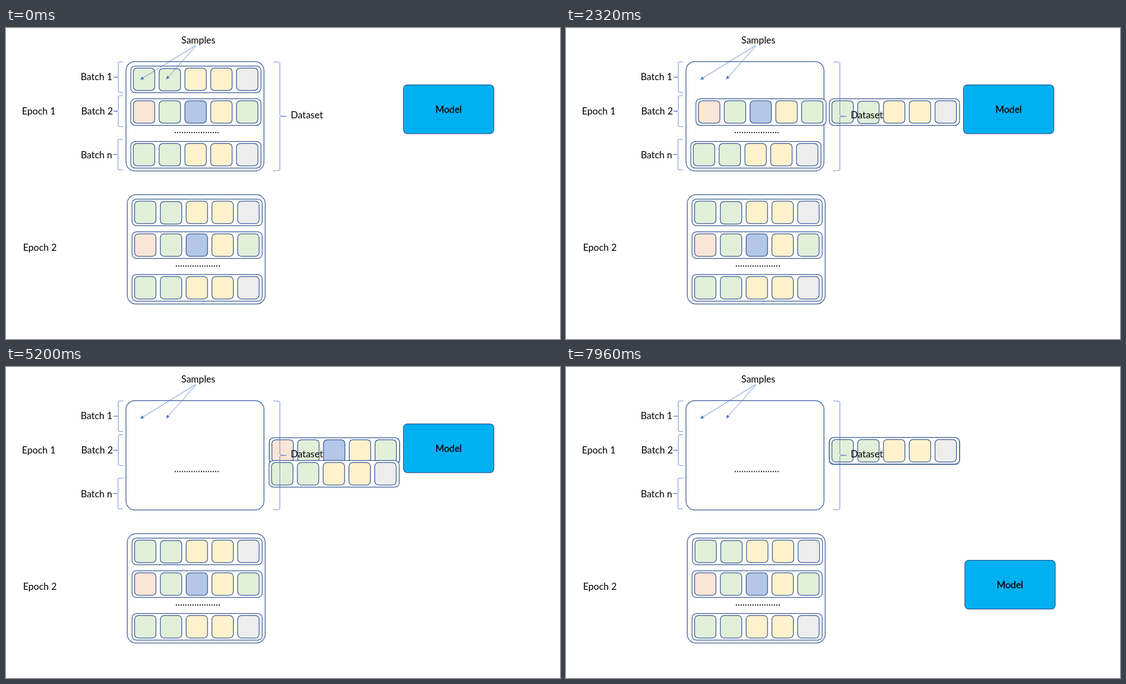
These frames come from a looping animation (998x561 px, 8 s). An HTML page:

```html
<!DOCTYPE html>
<html lang="en">
<head>
<meta charset="utf-8">
<title>Epochs and batches</title>
<style>
  html, body { margin: 0; width: 100%; height: 100%; overflow: hidden; background: #fff; }
  svg { display: block; width: 998px; height: 561px; }
  text { font: 17px Lato, "Open Sans", sans-serif; text-anchor: middle; fill: #000; }
  .box { fill: #fff; stroke: #2f528f; stroke-width: 1.25; }
  .line { fill: none; stroke: #4472c4; stroke-width: .85; }
  .dots { stroke: #000; stroke-width: 2.3; stroke-linecap: round; stroke-dasharray: 0 4.28; }
  .model { fill: #00b0f0; }
  .model + text { stroke: #000; stroke-width: .3; }
</style>
</head>
<body>
<svg id="stage" viewBox="0 0 998 561">
  <defs>
    <marker id="head" markerUnits="userSpaceOnUse" markerWidth="7" markerHeight="7" refX="6" refY="3" orient="auto">
      <path d="M0 0L6 3L0 6Z" fill="#4472c4"/>
    </marker>
  </defs>
</svg>
<script>
const LOOP = 8000, STEP = 40;
const stage = document.getElementById('stage');
const GREEN = '#e2f0d9', YELLOW = '#fff2cc', GREY = '#ededed', ORANGE = '#fbe5d6', BLUE = '#b4c7e7';
const PLAIN = [GREEN, GREEN, YELLOW, YELLOW, GREY];
const MIXED = [ORANGE, GREEN, BLUE, YELLOW, GREEN];

function add(parent, tag, attrs, content = '') {
  const node = document.createElementNS('http://www.w3.org/2000/svg', tag);
  for (const key in attrs) node.setAttribute(key, attrs[key]);
  node.textContent = content;
  parent.append(node);
  return node;
}

function box(parent, x, y, width, height, rx, extra) {
  return add(parent, 'rect', { class: 'box', x, y, width, height, rx, ...extra });
}

function label(content, x, y, parent = stage) {
  add(parent, 'text', { x, y }, content);
}

// A batch is a framed row of five samples; drop nudges the second one down.
function batch(x, y, colors, drop = 0) {
  const group = add(stage, 'g');
  box(group, x, y, 234.5, 48, 8);
  colors.forEach((color, i) =>
    box(group, x + 4.6 + i * 46.45, y + 3.7 + (i === 1 ? drop : 0), 38.6, 40.4, 6.7, { style: `fill:${color}` }));
  return group;
}

function dataset(x, y) {
  box(stage, x, y, 248.5, 197.2, 16);
  return [
    batch(x + 8.6, y + 8, PLAIN, .7),
    batch(x + 8.6, y + 67, MIXED),
    batch(x + 8.6, y + 144, PLAIN)
  ];
}

function dots(x, y) {
  add(stage, 'path', { class: 'dots', d: `M${x} ${y}h77.2` });
}

// Curly brace from top to bottom; a negative half-width points to the left.
function brace(x, top, bottom, half, tip = (top + bottom) / 2) {
  const r = Math.abs(half) / 6;
  add(stage, 'path', {
    class: 'line',
    d: `M${x} ${top}q${half} 0 ${half} ${r}V${tip - r}q0 ${r} ${half} ${r}` +
       `q${-half} 0 ${-half} ${r}V${bottom - r}q0 ${r} ${-half} ${r}`
  });
}

function arrow(x1, y1, x2, y2) {
  add(stage, 'path', { class: 'line', d: `M${x1} ${y1}L${x2} ${y2}`, 'marker-end': 'url(#head)' });
}

const first = dataset(216.2, 60.6);
const second = dataset(218.4, 300.7);

dots(305, 188.6);
dots(307, 429.4);
brace(211, 61, 116.5, -8.7);
brace(211, 122, 178, -8.7);
brace(210.5, 200.5, 256, -8.7);
brace(481.5, 61.2, 257.5, 11.8);
arrow(341, 32, 242, 93);
arrow(342.5, 32, 288.5, 92.5);

label('Samples', 346.5, 28);
label('Batch 1', 163, 94);
label('Batch 2', 164, 156.3);
label('Batch n', 163, 234.7);
label('Epoch 1', 59, 155.7);
label('Epoch 2', 61, 402);
label('Dataset', 542, 162.6);

const model = add(stage, 'g');
box(model, 716, 102.6, 162.8, 88, 7, { class: 'box model' });
label('Model', 797.3, 153.2, model);

const straight = (dx, dy) => `M0 0L${dx} ${dy}`;
const turn = (dx, dy) =>
  `M0 0H${dx / 2}C${dx * .724} 0 ${dx} ${dy * .276} ${dx} ${dy / 2}V${dy}`;

function move(node, start, duration, d) {
  const path = document.createElementNS('http://www.w3.org/2000/svg', 'path');
  path.setAttribute('d', d);
  return { node, start, duration, path, length: path.getTotalLength() };
}

const moves = [
  move(first[0], 88, 1670, turn(249.6, 59)),
  move(first[1], 2090, 1690, straight(249.6, 0)),
  move(first[2], 4022, 1600, turn(249.6, -77.4)),
  move(model, 5980, 1735, straight(2.5, 246)),
  move(second[0], 7900, 1670, turn(249.6, 59))
];

// Constant acceleration for the first half, constant braking for the second.
const ease = p => p < .5 ? 2 * p * p : 1 - 2 * (1 - p) ** 2;

function draw() {
  const time = Math.floor(performance.now() % LOOP / STEP) * STEP;
  for (const { node, start, duration, path, length } of moves) {
    const progress = Math.min(1, Math.max(0, (time - start) / duration));
    const { x, y } = path.getPointAtLength(length * ease(progress));
    node.setAttribute('transform', `translate(${x} ${y})`);
  }
  requestAnimationFrame(draw);
}
draw();
</script>
</body>
</html>
```
